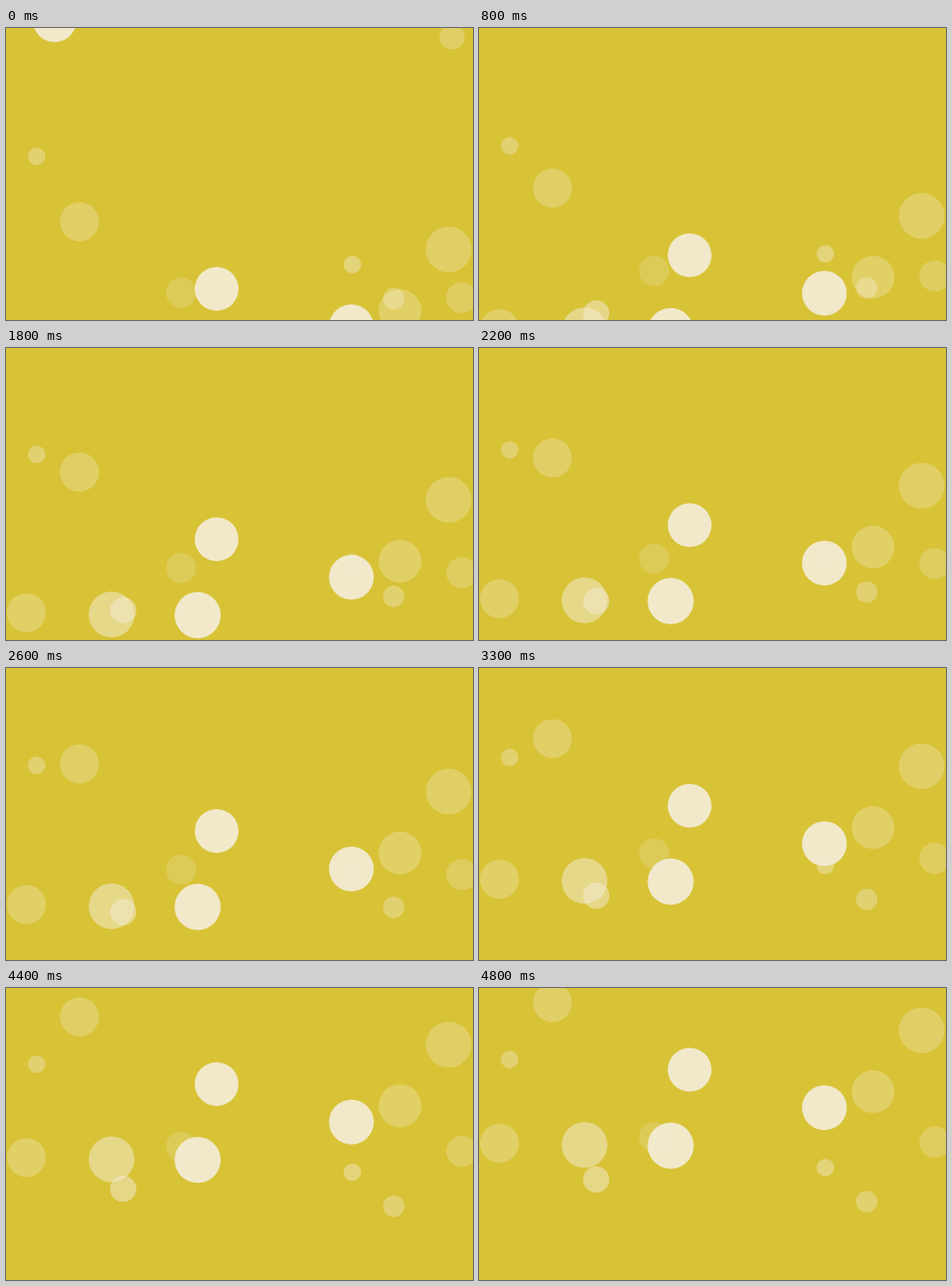
An HTML page with a canvas for the animation above (4.9 s loop, 480 by 300 pixels).

```html
<!DOCTYPE html>
<html lang="en">
<head>
<meta charset="utf-8">
<title>Rising bubbles</title>
<style>
  html, body { margin: 0; width: 100%; height: 100%; overflow: hidden; background: #d8c337; }
  canvas { display: block; width: 100vw; height: 100vh; }
</style>
</head>
<body>
<canvas id="stage" width="480" height="300"></canvas>
<script>
const ctx = document.getElementById('stage').getContext('2d');
const LOOP = 4900, STEP = 100;

// Speeds relative to the nearest layer
const NEAR = 1, MID = 0.645, FAR = 0.318;

// x, starting y, radius, opacity, speed; painted back to front
const bubbles = [
  [31.5, 132, 9, 0.36, FAR],
  [356, 243, 9, 0.42, FAR],
  [398.5, 278, 11, 0.36, FAR],
  [458.5, 9, 13, 0.3, MID],
  [180, 272, 15.5, 0.2, MID],
  [468.5, 277, 16, 0.25, MID],
  [75.5, 199, 20, 0.3, NEAR],
  [405, 290.5, 22, 0.29, NEAR],
  [455, 227.5, 23.5, 0.3, NEAR],
  [21, 343.5, 20, 0.29, NEAR],
  [108.5, 345.3, 23.5, 0.52, NEAR],
  [120.5, 315.5, 13.5, 0.5, MID],
  [50, -8, 22.5, 0.94, NEAR],
  [216.5, 268, 22.5, 0.94, NEAR],
  [355, 307, 23, 0.94, NEAR],
  [197, 346, 23.7, 0.94, NEAR]
];

// Step number and distance climbed; the climb hurries slightly twice
const climb = [[0, 0], [6, 23.5], [8, 34.5], [18, 71.5], [26, 100.5],
               [33, 126.5], [36, 137.5], [39, 151], [48, 184]];

function climbed(step) {
  const i = Math.max(1, climb.findIndex(([s]) => s >= step));
  const [s0, d0] = climb[i - 1], [s1, d1] = climb[i];
  return d0 + (d1 - d0) * (step - s0) / (s1 - s0);
}

function draw(now) {
  const rise = climbed(Math.floor(now % LOOP / STEP));
  ctx.globalAlpha = 1;
  ctx.fillStyle = '#d8c337';
  ctx.fillRect(0, 0, 480, 300);
  ctx.fillStyle = '#f4ecd5';
  for (const [x, y, r, alpha, speed] of bubbles) {
    ctx.globalAlpha = alpha;
    ctx.beginPath();
    ctx.arc(x, y - rise * speed, r, 0, 2 * Math.PI);
    ctx.fill();
  }
}

const start = performance.now();
function tick() {
  draw(performance.now() - start);
  requestAnimationFrame(tick);
}
tick();
</script>
</body>
</html>
```
